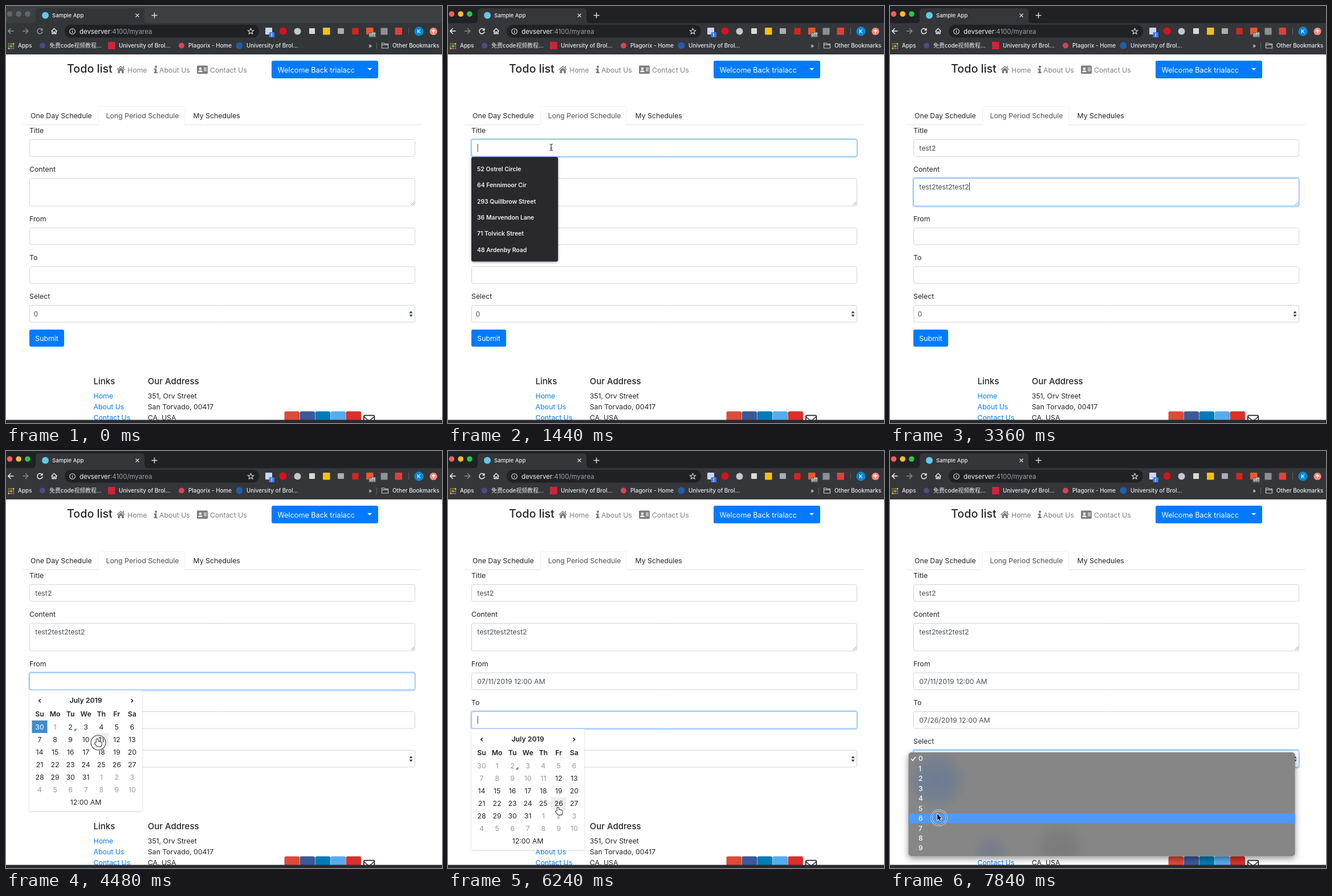
An HTML page with a canvas that plays this animation: 765x732 px, repeating every 8000 ms.

```html
<!DOCTYPE html>
<html lang="en">
<head>
<meta charset="utf-8">
<title>Todo list</title>
<style>
html, body { margin: 0; width: 100%; height: 100%; overflow: hidden; background: #fff; }
canvas { display: block; width: 765px; height: 732px; }
</style>
</head>
<body>
<canvas id="stage" width="765" height="732"></canvas>
<script>
const ctx = document.getElementById('stage').getContext('2d');
const LOOP = 8000, STEP = 160;
const INK = '#212529', GREY = '#7f7f7f', BLUE = '#007bff', VALUE = '#495057';
const BODY = 12.3;

// ---- helpers ----
function text(s, x, y, size, color, weight = 400, align = 'left') {
  ctx.font = `${weight} ${size}px Inter, "Noto Sans CJK SC", "Noto Sans", sans-serif`;
  ctx.fillStyle = color;
  ctx.textAlign = align;
  ctx.fillText(s, x, y);
}
function rect(x, y, w, h, color) {
  ctx.fillStyle = color;
  ctx.fillRect(x, y, w, h);
}
function box(x, y, w, h, r, fill, stroke, line = 1) {
  ctx.beginPath();
  ctx.roundRect(x, y, w, h, r);
  if (fill) { ctx.fillStyle = fill; ctx.fill(); }
  if (stroke) { ctx.strokeStyle = stroke; ctx.lineWidth = line; ctx.stroke(); }
}
function dot(x, y, r, color) {
  ctx.beginPath();
  ctx.arc(x, y, r, 0, 7);
  ctx.fillStyle = color;
  ctx.fill();
}
function ring(x, y, r, color, line = 1) {
  ctx.beginPath();
  ctx.arc(x, y, r, 0, 7);
  ctx.strokeStyle = color;
  ctx.lineWidth = line;
  ctx.stroke();
}
function shape(d, x, y, fill, stroke, line = 1) {
  const p = new Path2D(d);
  ctx.save();
  ctx.translate(x, y);
  if (stroke) { ctx.strokeStyle = stroke; ctx.lineWidth = line; ctx.stroke(p); }
  if (fill) { ctx.fillStyle = fill; ctx.fill(p); }
  ctx.restore();
}
function shadow(color, blur, y) {
  ctx.shadowColor = color;
  ctx.shadowBlur = blur;
  ctx.shadowOffsetY = y;
}
const typed = (s, t, start, perStep) =>
  t < start ? '' : s.slice(0, (Math.floor((t - start) / STEP) + 1) * perStep);

// ---- browser frame ----
function browser(active) {
  const bar = active ? '#35363a' : '#323639', icon = active ? '#f1f3f4' : '#8f9398';
  rect(0, 0, 765, 31, active ? '#202124' : '#3c4043');
  rect(0, 30, 765, 55, bar);
  shape('M46 30Q52 30 52 24V10Q52 4 58 4H237Q243 4 243 10V24Q243 30 249 30Z', 0, 0, bar);
  ['#ff5f57', '#febc2e', '#28c840'].forEach((c, i) => dot(6.5 + i * 15.7, 14, 4.8, active ? c : '#606468'));
  dot(69, 16.5, 6, '#61c9e8');
  text('Sample App', 81, 20, 9.6, '#e8eaed', 500);
  shape('M-3-3L3 3M3-3L-3 3', 230.5, 16.5, null, '#dadce0', 1.2);
  shape('M-5 0H5M0-5V5', 260.5, 16.5, null, '#dadce0', 1.5);

  const arrow = 'M5 0H-4.5M0-4.7L-4.7 0L0 4.7';
  shape(arrow, 8.5, 44, null, icon, 1.5);
  ctx.save();
  ctx.translate(34, 44);
  ctx.scale(-1, 1);
  shape(arrow, 0, 0, null, '#85898d', 1.5);
  ctx.restore();
  shape('M3.4-3A4.6 4.6 0 1 0 4.6 1', 59.5, 44, null, icon, 1.5);
  shape('M5-5.5V-.8H.3Z', 59.5, 44, icon);
  shape('M-5 .5L0-4.5L5 .5M-3.4-.5V4.6H-1V1.5H1V4.6H3.4V-.5', 84.5, 44, null, '#f1f3f4', 1.4);

  box(103, 33, 341, 22.5, 11.2, '#202124');
  ring(116.5, 44.5, 4.8, '#dfe1e5', 1.1);
  rect(116, 43.7, 1.1, 3.4, '#dfe1e5');
  rect(116, 41.7, 1.1, 1.2, '#dfe1e5');
  const host = 'devserver';
  text(host, 129, 48.5, 11.4, '#f1f3f4');
  text(':4100/myarea', 129 + ctx.measureText(host).width, 48.5, 11.4, '#9aa0a6');
  shape('M0-5.2L1.5-1.7L5.2-1.5L2.3 .9L3.3 4.6L0 2.5L-3.3 4.6L-2.3 .9L-5.2-1.5L-1.5-1.7Z', 429.5, 44.5, null, '#dfe1e5', 1.1);

  box(455, 38, 12, 12, 1, '#c9d7f4');
  box(461.5, 46, 9.5, 9, 1.5, '#3f7cf0');
  text('!', 466.2, 53.5, 8, '#fff', 700, 'center');
  dot(486, 44, 6.5, '#d8121c');
  dot(511.5, 44.5, 6, '#c4c8cc');
  box(532, 39, 10, 10, 1, '#d9dbd0');
  box(556, 38, 12.5, 12.5, 1, '#f4c20d');
  box(582, 39, 11, 10, 1, '#a9adb0');
  box(607.5, 38.5, 11, 11.5, 1, '#d9231c');
  box(632, 38, 12.5, 12, 1, '#f0562b');
  box(636.5, 46, 12.5, 9, 1.5, '#6b6f73');
  text('off', 642.8, 53, 7.5, '#fff', 500, 'center');
  box(657.5, 38.5, 12, 12, 1, '#8d9194');
  box(682.5, 38, 12.5, 12.5, 1, '#e2403a');
  rect(706, 38, 1, 12, '#5f6368');
  dot(724.5, 44.5, 8.2, '#0288d1');
  text('K', 724.5, 48, 9.5, '#fff', 500, 'center');
  dot(750, 44.5, 6.6, '#f28b82');
  shape('M0 3.5V-3M-2.8 0L0-3L2.8 0', 750, 44.5, null, '#fff', 1.5);

  const dots = ['#ea4335', '#34a853', '#fbbc04', '#4285f4'];
  for (let i = 0; i < 9; i++) {
    const col = i % 3, row = Math.floor(i / 3);
    rect(3.5 + col * 4, 65 + row * 4, 2.8, 2.8, dots[(col + row) % 4]);
  }
  const mark = (s, x) => text(s, x, 73.3, 9.9, '#e8eaed', 500);
  mark('Apps', 21);
  dot(64, 69.5, 5, '#474e85');
  mark('免费code视频教程...', 76);
  box(179, 63, 12.5, 13, 0, '#d3223a');
  mark('University of Brol...', 198);
  dot(308, 69.5, 5, '#d94352');
  mark('Plagorix - Home', 320);
  dot(409.5, 69.5, 6, '#1f5fa8');
  mark('University of Brol...', 422);
  mark('»', 636);
  rect(650, 64, 1, 12, '#5f6368');
  shape('M.5 9.5V.5H4.5L6 2H11.5V9.5ZM.5 3.7H11.5', 659, 64.5, null, '#c6c9cd', 1.2);
  mark('Other Bookmarks', 678);
}

// ---- page ----
function page() {
  rect(0, 84, 765, 648, '#fff');
  text('Todo list', 107, 116.5, 19.7, INK, 500);
  shape('M0 7L7.5 .5L15 7L14 8L7.5 2.5L1 8ZM2.3 8L7.5 3.7L12.8 8V13.5H9V9.5H6V13.5H2.3ZM11 1H13V4.5L11 2.8Z', 194, 104.5, GREY);
  text('Home', 213, 116.5, BODY, GREY);
  dot(263, 106.7, 2.1, GREY);
  shape('M0 0H4.8V6H6.3V8.3H0V6H1.5V2.3H0Z', 259.5, 109.7, GREY);
  text('About Us', 269, 116.5, BODY, GREY);
  box(335, 104.5, 19, 14.5, 1.8, GREY);
  dot(341, 110, 2.2, '#fff');
  shape('M0 3Q0 0 3.7 0Q7.4 0 7.4 3Z', 337.3, 113, '#fff');
  for (let i = 0; i < 3; i++) rect(347, 108.3 + i * 2.4, 5.2, 1.1, '#fff');
  text('Contact Us', 358, 116.5, BODY, GREY);
  box(466, 96, 187, 31, 3.2, BLUE);
  text('Welcome Back trialacc', 476.5, 116.5, 12.6, '#fff');
  shape('M-4 0H4L0 4Z', 638.2, 109, '#fff');

  rect(29, 208, 700, 1, '#dee2e6');
  shape('M.5 33V3.5Q.5 .5 3.5 .5H148.5Q151.5 .5 151.5 3.5V33', 162, 176, '#fff', '#dee2e6');
  text('One Day Schedule', 43, 197, BODY, INK);
  text('Long Period Schedule', 175.5, 197, BODY, VALUE);
  text('My Schedules', 328.5, 197, BODY, INK);

  box(41, 568, 61, 30, 3.2, BLUE);
  text('Submit', 51.3, 588, BODY, '#fff');

  text('Links', 153.5, 664, 15, INK, 500);
  text('Our Address', 248.7, 664, 15, INK, 500);
  ['Home', 'About Us', 'Contact Us'].forEach((s, i) => text(s, 153.5, 688.7 + i * 19, BODY, BLUE));
  ['351, Orv Street', 'San Torvado, 00417', 'CA, USA'].forEach((s, i) => text(s, 248.7, 688.7 + i * 19, BODY, INK));
  ['#dd4b39', '#3b5998', '#007bb6', '#55acee', '#d9302c'].forEach((c, i) => box(488.5 + i * 27, 711.5, 26.5, 26, 3, c));
  box(627.8, 718.7, 18.6, 14, 2, null, INK, 1.8);
  shape('M0 2Q7 8.5 9 8.5Q11 8.5 18 2', 628, 719, null, INK, 1.6);
}

// y, height, label, focus start, focus end
const fields = [
  [234, 30, 'Title', 1120, 2400],
  [302, 49, 'Content', 2400, 3840],
  [389, 30, 'From', 3840, 5120],
  [457, 30, 'To', 5120, 6720],
  [525, 30, 'Select', 7040, LOOP]
];
function values(t) {
  return [
    typed('test2', t, 1760, 2),
    typed('test2test2test2', t, 2720, 3),
    t < 4640 ? '' : '07/11/2019 12:00 AM',
    t < 6400 ? '' : '07/26/2019 12:00 AM',
    '0'
  ];
}
function form(t) {
  const vals = values(t);
  fields.forEach(([y, h, label, start, end], i) => {
    const focus = t >= start && t < end, fading = t >= end && t < end + STEP;
    text(label, 41, y - 11, BODY, INK);
    if (focus) box(39, y - 2, 680, h + 4.5, 5, '#bfdeff');
    box(41.5, y + .5, 676, h - .5, 3, '#fff', focus ? '#80bdff' : fading ? '#b4cde4' : '#ced4da');
    const pick = i === 4, x = pick ? 48.5 : 51.3;
    text(vals[i], x, y + 20, BODY, VALUE);
    const caret = vals[i] === '' ? (t - start) % 1000 < 500 : i < 2;
    if (focus && caret)
      rect(x + ctx.measureText(vals[i]).width + .3, y + 8, 1, 14, '#333');
    if (pick) shape('M-3-1.2H3L0-5.2ZM-3 1.2H3L0 5.2Z', 710.5, y + 15.5, '#343a40');
    if (i === 1) shape('M0 6L6 0M3 6L6 3', 710.5, y + h - 7.5, null, '#777', .8);
  });
}

function suggestions() {
  ctx.save();
  shadow('rgba(0,0,0,.4)', 4, 1);
  box(41, 265, 152, 183.5, 3, '#29292d');
  ctx.restore();
  ['52 Ostrel Circle', '64 Fennimoor Cir', '293 Quillbrow Street', '36 Marvendon Lane', '71 Tolvick Street', '48 Ardenby Road']
    .forEach((s, i) => text(s, 51, 289.7 + i * 28.4, 10.4, '#f1f1f2', 600));
}

// first: earliest selectable day of the month, picked: chosen day
function calendar(top, cur, first, picked) {
  ctx.save();
  shadow('rgba(0,0,0,.18)', 3, 1);
  rect(41, top, 198, 212, '#fff');
  ctx.restore();
  const col = i => 59 + i * 27.05;
  shape('M1.8-3L-1.3 0L1.8 3', 59, top + 18.5, null, INK, 1.6);
  shape('M-1.8-3L1.3 0L-1.8 3', 221.3, top + 18.5, null, INK, 1.6);
  text('July 2019', 140, top + 21.5, BODY, INK, 600, 'center');
  ['Su', 'Mo', 'Tu', 'We', 'Th', 'Fr', 'Sa'].forEach((s, i) => text(s, col(i), top + 46, BODY, INK, 600, 'center'));
  for (let day = 0; day < 42; day++) {
    const x = col(day % 7), y = top + 64 + Math.floor(day / 7) * 22.15;
    // the day before the 2nd is shown greyed in both pickers
    const free = day > 1 && day < 32 && day >= first;
    const n = day === 0 ? 30 : (day - 1) % 31 + 1;
    const over = cur.kind === 'hand' && Math.abs(cur.x - x) < 13.5 && Math.abs(cur.y - y) < 11;
    const on = day === picked;
    if (on || over) rect(x - 13.5, y - 11, 27, 22, on ? '#428bca' : '#eee');
    text(n, x, y + 4.5, BODY, on ? '#fff' : free ? INK : '#999', 400, 'center');
    if (day === 2) shape('M0 5V0L-5 5Z', x + 10.3, y + 2.3, '#428bca');
  }
  text('12:00 AM', 140, top + 201, BODY, INK, 400, 'center');
}

function blob(x, y, r, color) {
  const g = ctx.createRadialGradient(x, y, 0, x, y, r);
  g.addColorStop(0, `rgba(${color},.5)`);
  g.addColorStop(.5, `rgba(${color},.38)`);
  g.addColorStop(1, `rgba(${color},0)`);
  rect(x - r, y - r, 2 * r, 2 * r, g);
}
function options(cur) {
  ctx.save();
  shadow('rgba(0,0,0,.45)', 12, 4);
  box(32.5, 529, 678, 182, 5, '#868686');
  ctx.restore();
  ctx.save();
  ctx.beginPath();
  ctx.roundRect(32.5, 529, 678, 182, 5);
  ctx.clip();
  blob(82, 579, 54, '83,113,160');
  blob(298, 698, 50, '112,112,114');
  blob(178, 708, 36, '100,116,145');
  const row = 17.45, hit = Math.floor((cur.y - 531.7) / row);
  rect(32, 531.7 + hit * row, 680, row, '#4f99fb');
  ctx.restore();
  for (let i = 0; i < 10; i++) text(i, 50, 544.4 + i * row, 12, '#fff', 500);
  shape('M0 3.5L2.5 6.5L7.5 0', 37.3, 537, null, '#fff', 1.6);
}

// ---- pointer: time, x, y of the hot spot, kind ----
const track = [
  [0, 0, 0, ''], [160, 430, 420, 'arrow'], [480, 215, 272, 'arrow'], [640, 181, 248, 'beam'],
  [1760, 181, 248, ''], [2080, 190, 288, 'arrow'], [2240, 198, 330, 'beam'], [2720, 198, 330, ''],
  [3520, 198, 330, 'beam'], [3680, 193, 370, 'arrow'], [3840, 186, 403, 'beam'], [4160, 184, 430, 'hand'],
  [4480, 160, 506, 'hand'], [4640, 160, 506, 'hand'], [4800, 245, 485, 'arrow'], [4960, 272, 473, 'beam'],
  [5280, 268, 474, 'beam'], [5440, 236, 520, 'hand'], [6080, 195, 622, 'hand'], [6240, 193, 626, 'hand'],
  [6400, 193, 626, 'hand'], [6720, 255, 590, 'arrow'], [7040, 303, 548, 'arrow'], [7360, 303, 548, 'arrow'],
  [7520, 215, 588, 'arrow'], [7680, 112, 632, 'arrow'], [7840, 83, 637, 'arrow'], [LOOP, 83, 637, 'arrow']
];
const clicks = [320, 1120, 2240, 3840, 4480, 5120, 6400, 7040, 7840];
function pointer(t) {
  const i = track.findIndex(k => k[0] > t) - 1;
  const [t0, x0, y0, kind] = track[i], [t1, x1, y1] = track[i + 1];
  const p = (t - t0) / (t1 - t0);
  return { x: x0 + (x1 - x0) * p, y: y0 + (y1 - y0) * p, kind };
}
function drawPointer(c, click) {
  if (!c.kind) return;
  if (click) {
    const [dx, dy] = { arrow: [3, 7], hand: [2, 6], beam: [0, 0] }[c.kind];
    ring(c.x + dx, c.y + dy, 13, 'rgba(255,255,255,.9)', 3);
    ring(c.x + dx, c.y + dy, 13, '#333', 1.1);
  }
  if (c.kind === 'arrow') shape('M0 0V11L2.5 8.8L4.3 12.5L6 11.7L4.3 8H7.5Z', c.x, c.y, '#111', '#fff', 1.6);
  if (c.kind === 'beam') shape('M-2.8-5.5Q0-5.5 0-4Q0-5.5 2.8-5.5M0-4.5V4.5M-2.8 5.5Q0 5.5 0 4Q0 5.5 2.8 5.5M-1.5 1.5H1.5', c.x, c.y, null, '#222', 1.1);
  if (c.kind === 'hand')
    shape('M-1.3 6.5V.5Q0-1 1.3 .5V4Q2.6 3.2 3.6 4.5Q5 3.8 5.8 5.2Q7.6 4.8 7.6 6.5V9L6.3 12.5H.2L-3.8 7.5Q-4.2 5.6-2.6 5.8ZM1.3 4V7M3.6 4.5V7M5.8 5.2V7', c.x, c.y, '#fff', '#222', 1.8);
}

function draw(t) {
  const cur = pointer(t);
  page();
  form(t);
  if (t >= 1280 && t < 1760) suggestions();
  if (t >= 4160 && t < 5120) calendar(420, cur, 1, t >= 4640 ? 11 : 0);
  if (t >= 5280 && t < 6720) calendar(488, cur, 12, t >= 6400 ? 26 : -1);
  if (t >= 7200) options(cur);
  rect(0, 726.5, 765, 6, '#292a2d');
  browser(t >= 320);
  drawPointer(cur, clicks.includes(t));
}

const begin = performance.now();
function tick() {
  const t = (performance.now() - begin) % LOOP;
  draw(Math.floor(t / STEP) * STEP);
  requestAnimationFrame(tick);
}
tick();
</script>
</body>
</html>
```
